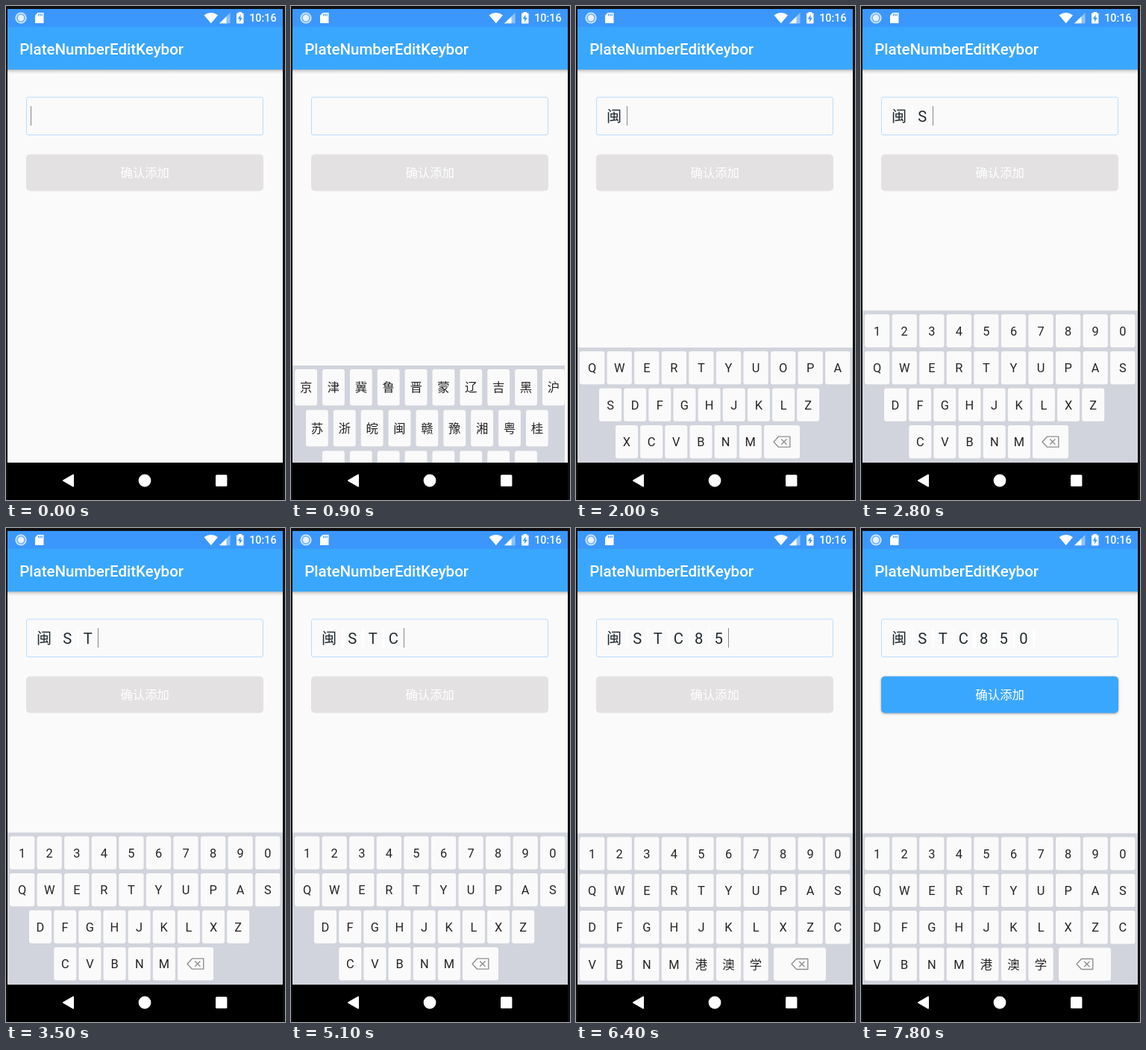
An HTML page with a canvas for the animation above (8000 ms loop, 374x661 px).

```html
<!DOCTYPE html>
<html lang="zh-CN">
<head>
<meta charset="utf-8">
<style>
html, body { margin: 0; width: 100%; height: 100%; overflow: hidden; background: #101013; }
canvas { display: block; width: 374px; height: 661px; }
</style>
</head>
<body>
<canvas id="stage"></canvas>
<script>
const W = 374, H = 661, LOOP = 8000;
const FONT = 'Roboto, "Noto Sans CJK SC", "Noto Sans CJK", sans-serif';
const BLUE = '#3aa7ff', PAPER = '#fafafa', NAV_TOP = 611;

const canvas = document.getElementById('stage');
const ctx = canvas.getContext('2d');
const dpr = window.devicePixelRatio || 1;
canvas.width = W * dpr;
canvas.height = H * dpr;

// Each entry: character, key press, key release, centre x in the field
const TYPED = [
  ['闽', 1800, 2000, 51], ['S', 2700, 2800, 82.3], ['T', 3400, 3500, 109.8],
  ['C', 4100, 4200, 137.2], ['8', 5700, 5800, 164.6], ['5', 6300, 6400, 191.2],
  ['0', 7200, 7300, 217.8]
];
const CARET_X = [33.5, 68.5, 96, 123.5, 151.5, 178, 204.5, 231.5];
const CARET_ON = [
  [0, 100], [600, 900], [1000, 1500], [2000, 2400], [2800, 3300], [3500, 4000],
  [4200, 4600], [5100, 5600], [5800, 6200], [6400, 6800], [7300, 7800]
];

// Rows: labels, first x, pitch, key width, optional delete key x and width
const wide = (keys, ...del) => [keys, 5, 36.57, 33.3, ...del];
const slim = (keys, x, ...del) => [keys, x, 33.15, 30, ...del];
const area = (keys, x, ...del) => [keys, x, 36.87, 29.8, ...del];

const PROVINCES = {
  top: 387, first: 392, step: 54.6, h: 48.6, right: 367,
  rows: [
    area('京津冀鲁晋蒙辽吉黑沪', 5.2), area('苏浙皖闽赣豫湘粤桂', 20),
    area('渝川贵云藏陕甘青', 42), area('琼新宁鄂', 79, 226.5, 48)
  ]
};
const LETTERS = {
  top: 457, first: 462, step: 49.5, h: 44.3, right: 371,
  rows: [wide('QWERTYUOPA'), slim('SDFGHJKLZ', 31), slim('XCVBNM', 53, 252, 48)]
};
const MIXED = {
  top: 407.5, first: 412.5, step: 49.5, h: 44.3, right: 371,
  rows: [wide('1234567890'), wide('QWERTYUPAS'), slim('DFGHJKLXZ', 31), slim('CVBNM', 64.3, 230, 48)]
};
const FULL = {
  top: 408.5, first: 413.5, step: 49.3, h: 44.3, right: 371,
  rows: [wide('1234567890'), wide('QWERTYUPAS'), wide('DFGHJKLXZC'), wide('VBNM港澳学', 265, 70)]
};

function rect(x, y, w, h, color) {
  ctx.fillStyle = color;
  ctx.fillRect(x, y, w, h);
}

function round(x, y, w, h, r, color) {
  ctx.beginPath();
  ctx.roundRect(x, y, w, h, r);
  ctx.fillStyle = color;
  ctx.fill();
}

function disc(x, y, r, color) {
  ctx.beginPath();
  ctx.arc(x, y, r, 0, Math.PI * 2);
  ctx.fillStyle = color;
  ctx.fill();
}

function trace(...pts) {
  ctx.beginPath();
  for (let i = 0; i < pts.length; i += 2) ctx.lineTo(pts[i], pts[i + 1]);
  ctx.closePath();
}

function poly(color, ...pts) {
  trace(...pts);
  ctx.fillStyle = color;
  ctx.fill();
}

function text(str, x, y, size, color, align = 'center', weight = 400) {
  ctx.font = `${weight} ${size}px ${FONT}`;
  ctx.textAlign = align;
  ctx.fillStyle = color;
  ctx.fillText(str, x, y);
}

function statusBar() {
  rect(2, 4, 369, 24, '#3b97fc');
  disc(20, 16, 7.6, '#d5e9ff');
  disc(20, 16, 6, '#76b6fb');
  disc(20, 16, 4.2, '#e6f2ff');

  poly('#fff', 42.5, 9, 50.5, 9, 50.5, 23, 39, 23, 39, 12.5);
  for (let i = 0; i < 3; i++) rect(43 + i * 2.3, 10.3, 1.2, 3, '#3b97fc');

  ctx.beginPath();
  ctx.moveTo(265.5, 12.3);
  ctx.quadraticCurveTo(274.8, 5.6, 284, 12.3);
  ctx.lineTo(274.8, 23.3);
  ctx.fillStyle = '#fff';
  ctx.fill();

  poly('#8cc2fd', 300.5, 9, 300.5, 23.3, 286, 23.3);
  poly('#fff', 295.5, 14, 295.5, 23.3, 286, 23.3);

  round(309, 9.5, 9.5, 14, 1, '#fff');
  rect(311.5, 8, 4.5, 2, '#fff');
  poly('#3b97fc', 314.6, 11.5, 310.8, 17.2, 313.2, 17.2, 313, 21.5, 316.8, 15.8, 314.4, 15.8);
  text('10:16', 362.6, 21.2, 14.35, '#fff', 'right', 500);
}

function appBar() {
  const shade = ctx.createLinearGradient(0, 85, 0, 91);
  shade.addColorStop(0, 'rgba(0,0,0,.27)');
  shade.addColorStop(0.4, 'rgba(0,0,0,.1)');
  shade.addColorStop(1, 'rgba(0,0,0,0)');
  rect(2, 85, 369, 6, shade);
  rect(2, 28, 369, 57, BLUE);
  text('PlateNumberEditKeybor', 18.2, 65, 20.5, '#fff', 'left', 500);
}

function field(count, t) {
  ctx.beginPath();
  ctx.roundRect(27.5, 122, 317, 50.5, 2.5);
  ctx.strokeStyle = '#b9dcfb';
  ctx.lineWidth = 1;
  ctx.stroke();
  for (let i = 0; i < count; i++) {
    const [char, , , x] = TYPED[i];
    text(char, x, 154.8, 20.2, '#222b30');
    rect(CARET_X[i + 1] - 0.5, 134, 2, 26, '#fff');
  }
  if (CARET_ON.some(([a, b]) => t >= a && t < b)) {
    rect(Math.floor(CARET_X[count]), 134, 1, 26, '#858585');
  }
}

function button(ready) {
  ctx.save();
  if (ready) {
    ctx.shadowColor = 'rgba(0,0,0,.35)';
    ctx.shadowBlur = 3 * dpr;
    ctx.shadowOffsetY = dpr;
  }
  round(27, 198.5, 318, 49, 5, ready ? BLUE : '#e3e1e1');
  ctx.restore();
  text('确认添加', 186.2, 229, 16.4, '#fff');
}

function deleteIcon(x, y) {
  ctx.strokeStyle = '#8f9093';
  ctx.lineWidth = 1.4;
  ctx.lineJoin = 'round';
  trace(x - 11, y, x - 4.5, y - 7, x + 10.8, y - 7, x + 10.8, y + 7, x - 4.5, y + 7);
  ctx.stroke();
  ctx.beginPath();
  for (const s of [-1, 1]) {
    ctx.moveTo(x - 0.8, y - 3.6 * s);
    ctx.lineTo(x + 6.4, y + 3.6 * s);
  }
  ctx.stroke();
}

function keyboard(kb, shift, pressed) {
  ctx.save();
  ctx.beginPath();
  ctx.rect(2, 300, 369, NAV_TOP - 300);
  ctx.clip();
  ctx.translate(0, shift);
  rect(2, kb.top, kb.right - 2, NAV_TOP - kb.top, '#d1d4dc');
  kb.rows.forEach(([keys, x0, pitch, w, delX, delW], row) => {
    const y = kb.first + row * kb.step, mid = y + kb.h / 2;
    [...keys].forEach((key, i) => {
      const x = x0 + i * pitch;
      round(x, y, w, kb.h, 3, key === pressed ? '#c3c6cd' : PAPER);
      text(key, x + w / 2, mid + 6, 16.4, '#252525');
    });
    if (delX) {
      round(delX, y, delW, kb.h, 3, PAPER);
      deleteIcon(delX + delW / 2, mid);
    }
  });
  ctx.restore();
}

function navBar() {
  rect(2, NAV_TOP, 369, H - NAV_TOP, '#000');
  ctx.lineJoin = 'round';
  ctx.lineWidth = 2;
  ctx.strokeStyle = '#fff';
  poly('#fff', 77, 635, 90, 627.5, 90, 642.5);
  ctx.stroke();
  disc(186, 635, 8.4, '#fff');
  round(281, 627.3, 15.4, 15.4, 1.5, '#fff');
}

function draw(t) {
  ctx.setTransform(dpr, 0, 0, dpr, 0, 0);
  rect(0, 0, W, H, '#101013');
  rect(2, 4, 369, NAV_TOP - 4, PAPER);
  const count = TYPED.filter(k => t >= k[2]).length;
  const held = TYPED.find(k => t >= k[1] && t < k[2]);
  statusBar();
  appBar();
  field(count, t);
  button(count === TYPED.length);
  if (t >= 900) {
    const kb = count === 0 ? PROVINCES : count === 1 ? LETTERS : count < 6 ? MIXED : FULL;
    keyboard(kb, t < 1000 ? 94 : 0, held && held[0]);
  }
  navBar();
}

function tick() {
  draw(performance.now() % LOOP);
  requestAnimationFrame(tick);
}
tick();
</script>
</body>
</html>
```
